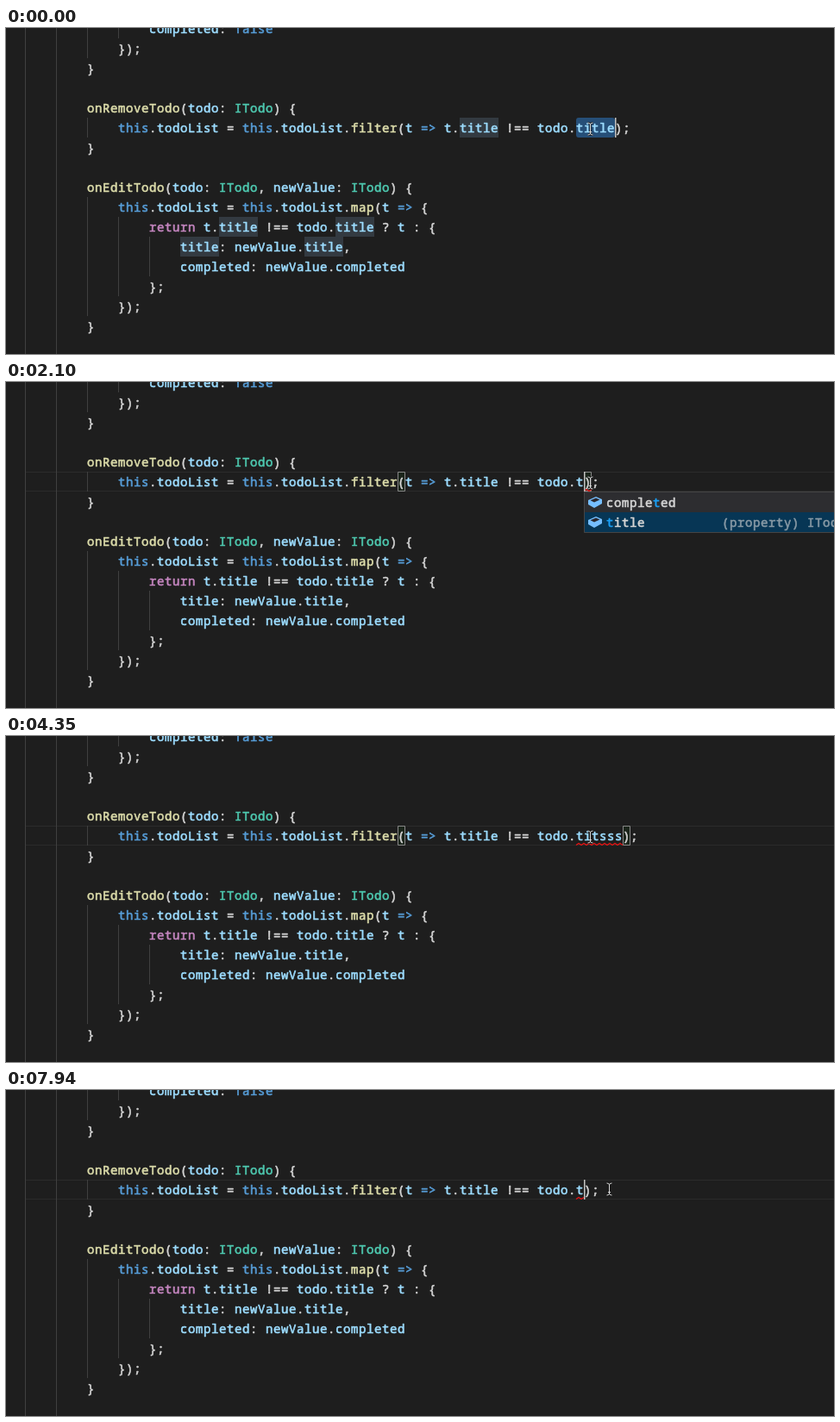
Write an HTML page with a canvas that moves like this. It is 960 px wide and 378 px high and loops after 8000 ms.

```html
<!DOCTYPE html>
<html lang="en">
<head>
<meta charset="utf-8">
<title>Editing a property name</title>
<style>
html, body { margin: 0; width: 100%; height: 100%; overflow: hidden; background: #1e1e1e; }
canvas { display: block; }
</style>
</head>
<body>
<canvas id="stage" width="960" height="378"></canvas>
<script>
const ctx = document.getElementById('stage').getContext('2d');
const LOOP = 8000, LEFT = 22, CHAR = 9, ROW = 23, EDIT_TOP = 104;
const FONT = '500 14px "Noto Sans Mono", "DejaVu Sans Mono", monospace';
const GRAY = '#d4d4d4', LIGHT = '#9cdcfe';

// Rows are counted from the edited line, columns from the first indent guide.
const code = [
  [-5, 16, 'completed: false'],
  [-4, 12, '});'],
  [-3, 8, '}'],
  [-1, 8, 'onRemoveTodo(todo: ITodo) {'],
  [1, 8, '}'],
  [3, 8, 'onEditTodo(todo: ITodo, newValue: ITodo) {'],
  [4, 12, 'this.todoList = this.todoList.map(t => {'],
  [5, 16, 'return t.title !== todo.title ? t : {'],
  [6, 20, 'title: newValue.title,'],
  [7, 20, 'completed: newValue.completed'],
  [8, 16, '};'],
  [9, 12, '});'],
  [10, 8, '}']
];
const editHead = 'this.todoList = this.todoList.filter(t => t.title !== todo';
const END = 12 + editHead.length;

// column, first row, row after the last
const guides = [[0, -5, 12], [4, -5, 12], [8, -5, -3], [12, -5, -4],
  [8, 0, 1], [8, 4, 10], [12, 5, 9], [16, 6, 8]];
const matches = [[0, 56], [5, 25], [5, 40], [6, 20], [6, 36]];
const members = [['completed', 'boolean'], ['title', 'string']];

// Each step changes part of the state from its time on.
const steps = [
  [0, { tail: '.title', caret: true, selected: true, strong: false, brackets: false,
        wave: null, suggest: false, hover: false, mouse: [677, 117] }],
  [300, { strong: true }],
  [450, { caret: false }],
  [750, { tail: '.', selected: false, caret: true }],
  [900, { tail: '', brackets: true }],
  [1200, { wave: [54, 70] }],
  [1350, { caret: false }],
  [1650, { tail: '.', caret: true, suggest: true }],
  [1950, { tail: '.t' }],
  [2100, { wave: [72, 73] }],
  [2250, { tail: '.tit', wave: [74, 75] }],
  [2550, { wave: [71, 74] }],
  [2850, { caret: false }],
  [3300, { caret: true }],
  [3600, { tail: '.tits', suggest: false }],
  [3750, { tail: '.titss' }],
  [3900, { tail: '.titsss' }],
  [4200, { wave: [71, 77] }],
  [4350, { caret: false }],
  [4950, { caret: true, mouse: [704, 113] }],
  [5100, { mouse: [744, 108] }],
  [5240, { mouse: [716, 113] }],
  [5390, { caret: false, mouse: [699, 115] }],
  [5840, { caret: true, hover: true }],
  [6440, { caret: false }],
  [6890, { caret: true }],
  [7340, { caret: false, hover: false }],
  [7490, { caret: true }],
  [7940, { tail: '.t', brackets: false, wave: [71, 72] }]
];

const colX = col => LEFT + col * CHAR;
const rowY = row => EDIT_TOP + row * ROW;

function box(x, y, w, h, color) {
  ctx.fillStyle = color;
  ctx.fillRect(x, y, w, h);
}

function frame(x, y, w, h, color) {
  ctx.strokeStyle = color;
  ctx.lineWidth = 1;
  ctx.strokeRect(x + .5, y + .5, w - 1, h - 1);
}

function shape(color, ...points) {
  ctx.fillStyle = color;
  ctx.beginPath();
  points.forEach(p => ctx.lineTo(...p));
  ctx.fill();
}

// A thin outline gives the letters a semi-bold weight.
function text(str, x, y, color) {
  ctx.fillStyle = ctx.strokeStyle = color;
  ctx.lineWidth = .6;
  [...str].forEach((c, i) => {
    ctx.fillText(c, x + i * CHAR, y);
    ctx.strokeText(c, x + i * CHAR, y);
  });
}

function tokenColor(token, next) {
  if (/^(this|false|=>)$/.test(token)) return '#569cd6';
  if (token === 'return') return '#c586c0';
  if (token === 'ITodo') return '#4ec9b0';
  if (!/\w/.test(token)) return GRAY;
  return next === '(' ? '#dcdcaa' : LIGHT;
}

function codeLine(row, col, str) {
  for (const m of str.matchAll(/\w+|=>|\S/g)) {
    const next = str[m.index + m[0].length];
    text(m[0], colX(col + m.index), rowY(row) + 17, tokenColor(m[0], next));
  }
}

function drawWave(from, to) {
  const end = colX(to);
  ctx.strokeStyle = '#f01414';
  ctx.lineWidth = 1.2;
  ctx.beginPath();
  for (let x = colX(from), i = 0; x <= end; x += 3, i++) ctx.lineTo(x, i % 2 ? 124.4 : 126.4);
  ctx.stroke();
}

function cube(x, y) {
  shape('#75beff', [x, y + 5], [x + 9, y + 1], [x + 16, y + 4], [x + 16, y + 9], [x + 7, y + 14], [x, y + 10]);
  shape('#2b282e', [x + 2.5, y + 5.2], [x + 9, y + 2.5], [x + 13.5, y + 4.4], [x + 7, y + 7.6]);
}

// Indexes of the label's letters that match the query in order, or null.
function findLetters(label, query) {
  const hits = [];
  let from = 0;
  for (const c of query) {
    const i = label.indexOf(c, from);
    if (i < 0) return null;
    hits.push(i);
    from = i + 1;
  }
  return hits;
}

function drawSuggest(left, query) {
  const items = members.filter(([label]) => findLetters(label, query));
  const top = rowY(1), focus = query ? items.length - 1 : 0;
  box(left, top, 432, items.length * ROW + 2, '#2d2d30');
  items.forEach(([label, type], i) => {
    const y = top + 1 + i * ROW;
    if (i === focus) {
      const detail = `(property) ITodo.${label}: ${type}`;
      box(left, y, 432, ROW, '#073655');
      text(detail, left + 430 - detail.length * CHAR, y + 17, '#8799a5');
    }
    cube(left + 5, y + 4);
    const hits = findLetters(label, query);
    [...label].forEach((c, n) =>
      text(c, left + 26 + n * CHAR, y + 17, hits.includes(n) ? '#1a9ff5' : GRAY));
  });
  frame(left, top, 432, items.length * ROW + 2, '#454545');
}

function drawHover() {
  box(661, 41, 320, 65, '#2d2d30');
  frame(661, 41, 320, 65, '#4a4a4a');
  box(661, 73, 320, 1, '#4a4a4a');
  text("[ts] Property 'titsss' does not exist on type 'ITodo'.", 667, 63, GRAY);
  text('any', 667, 95, LIGHT);
}

function drawMouse(x, y) {
  for (const [color, width] of [['rgba(17,17,17,.7)', 2.4], ['#d8d8d8', 1]]) {
    ctx.strokeStyle = color;
    ctx.lineWidth = width;
    ctx.beginPath();
    for (const s of [-1, 1]) {
      ctx.moveTo(x - 2.5, y + s * 7);
      ctx.quadraticCurveTo(x + .5, y + s * 7, x + .5, y + s * 5);
      ctx.quadraticCurveTo(x + .5, y + s * 7, x + 3.5, y + s * 7);
    }
    ctx.moveTo(x + .5, y - 5);
    ctx.lineTo(x + .5, y + 5);
    ctx.moveTo(x - 1, y + 3.5);
    ctx.lineTo(x + 2, y + 3.5);
    ctx.stroke();
  }
}

function draw(time) {
  const s = Object.assign({}, ...steps.filter(([t]) => t <= time).map(([, change]) => change));
  const caretCol = END + s.tail.length, caretX = colX(caretCol);

  box(0, 0, 960, 378, '#1e1e1e');
  if (s.selected) {
    for (const [row, col] of matches) {
      box(colX(col), rowY(row), 5 * CHAR, ROW, s.strong ? '#474c52' : '#333a41');
    }
    ctx.fillStyle = '#264f78';
    ctx.beginPath();
    ctx.roundRect(colX(71), EDIT_TOP, 5 * CHAR, ROW, 3);
    ctx.fill();
  } else {
    box(LEFT, EDIT_TOP, 938, 1, '#2b2b2b');
    box(LEFT, EDIT_TOP + 22, 938, 1, '#2b2b2b');
  }
  for (const [col, from, to] of guides) {
    box(colX(col), rowY(from), 1, (to - from) * ROW, '#404040');
  }
  if (s.brackets) {
    for (const col of [48, caretCol]) {
      box(colX(col), EDIT_TOP, CHAR, ROW, 'rgba(0,100,0,.1)');
      frame(colX(col), EDIT_TOP, CHAR, ROW, '#888');
    }
  }

  ctx.font = FONT;
  ctx.lineJoin = 'round';
  code.forEach(line => codeLine(...line));
  codeLine(0, 12, editHead + s.tail + ');');
  if (s.wave) drawWave(...s.wave);
  if (s.caret) box(caretX, EDIT_TOP, 1.5, ROW, '#c4c4c2');
  if (s.suggest) drawSuggest(caretX, s.tail.slice(1));
  if (s.hover) drawHover();
  drawMouse(...s.mouse);
}

function tick() {
  draw(performance.now() % LOOP);
  requestAnimationFrame(tick);
}
tick();
</script>
</body>
</html>
```
